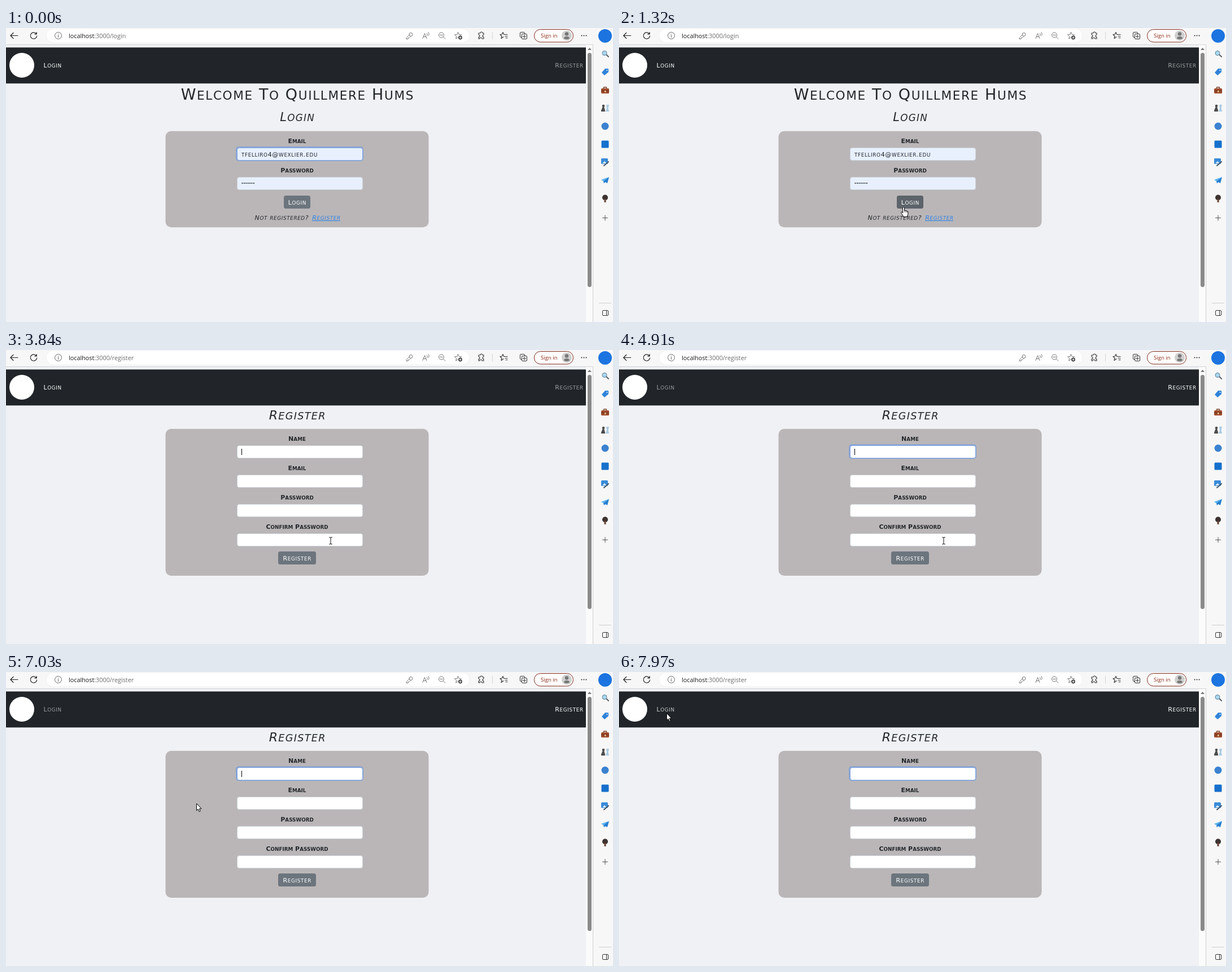
An HTML page with a canvas for the animation above (8 s loop, 1075 px wide and 521 px high).

```html
<!DOCTYPE html>
<html lang="en">
<head>
<meta charset="utf-8">
<title>Login and register</title>
<style>
html, body { margin: 0; width: 100%; height: 100%; overflow: hidden; background: #f0f1f4; }
canvas { display: block; }
</style>
</head>
<body>
<canvas id="stage" width="1075" height="521"></canvas>
<script>
const ctx = document.getElementById('stage').getContext('2d');
const LOOP = 8000;
const INK = '#212529', LINE = '#333333', MID = 515.5;

// time, x, y, pointer kind
const moves = [
  [0, 0, 0, 'none'],
  [510, 714, 422, 'arrow'], [640, 628, 396, 'arrow'],
  [930, 603, 384, 'arrow'], [1060, 566, 362, 'arrow'], [1190, 530, 337, 'arrow'],
  [1320, 504, 317, 'hand'], [1450, 503, 314, 'hand'], [1580, 504, 311, 'hand'],
  [1710, 506, 307, 'hand'], [1840, 527, 324, 'arrow'], [1970, 560, 334, 'hand'],
  [2100, 573, 338, 'hand'], [3840, 575, 338, 'beam'],
  [6510, 480, 284, 'arrow'], [6640, 376, 242, 'arrow'], [6760, 304, 218, 'arrow'],
  [7030, 337, 233, 'arrow'], [7170, 232, 138, 'arrow'], [7300, 141, 66, 'arrow'],
  [7440, 112, 67, 'arrow'], [7570, 92, 70, 'arrow'], [7700, 80, 75, 'arrow'],
  [7970, 84, 73, 'arrow']
];
const caretFlips = [3840, 4370, 4910, 5180, 5320, 5580, 5970, 6510, 7030, 7570];

function box(x, y, w, h, r, fill, stroke) {
  ctx.beginPath();
  ctx.roundRect(x, y, w, h, r);
  paint(fill, stroke);
}

function disc(x, y, r, fill, stroke) {
  ctx.beginPath();
  ctx.arc(x, y, r, 0, Math.PI * 2);
  paint(fill, stroke);
}

function paint(fill, stroke, width = 1) {
  if (fill) { ctx.fillStyle = fill; ctx.fill(); }
  if (stroke) { ctx.strokeStyle = stroke; ctx.lineWidth = width; ctx.stroke(); }
}

function shape(d, x, y, fill, stroke, width) {
  const p = new Path2D(d);
  ctx.save();
  ctx.translate(x, y);
  ctx.lineJoin = ctx.lineCap = 'round';
  if (fill) { ctx.fillStyle = fill; ctx.fill(p); }
  if (stroke) { ctx.strokeStyle = stroke; ctx.lineWidth = width || 1; ctx.stroke(p); }
  ctx.restore();
}

function text(s, x, y, size, color) {
  ctx.font = `${size}px "Open Sans", "Noto Sans", sans-serif`;
  ctx.letterSpacing = '0px';
  ctx.fillStyle = color;
  ctx.fillText(s, x, y);
  return x + ctx.measureText(s).width;
}

// Wide small caps; y is the middle of the capitals.
function caps(s, x, y, size, color, { align = 0, style = '', track = 0.06 } = {}) {
  const gap = track * size;
  const runs = s.match(/[a-z]+|[^a-z]+/g).map(run => {
    const px = /[a-z]/.test(run) ? size * 0.8 : size;
    const font = `${style} ${px}px "DejaVu Sans", sans-serif`;
    const label = run.toUpperCase();
    ctx.font = font;
    ctx.letterSpacing = gap + 'px';
    return { font, label, width: ctx.measureText(label).width };
  });
  const total = runs.reduce((sum, r) => sum + r.width, 0) - gap;
  let left = x - total * align;
  const start = left;
  ctx.fillStyle = color;
  for (const r of runs) {
    ctx.font = r.font;
    ctx.letterSpacing = gap + 'px';
    ctx.fillText(r.label, left, y + size * 0.365);
    left += r.width;
  }
  return { start, end: start + total };
}

const centered = (s, y, size, style, track) => caps(s, MID, y, size, INK, { align: 0.5, style, track });
const label = (s, y) => centered(s, y, 11, 'bold', 0);
const card = (y, h) => box(282.5, y, 466, h, 10, '#bab6b8');

function field(y, fill, focus) {
  if (focus) box(407, y - 2, 226, 26, 5, '#88a3d0');
  box(409.5, y + 0.5, 222, 22, 3.5, fill, focus ? '#86abe6' : '#ced4da');
}

function button(s, x, y, w, fill) {
  box(x, y, w, 23, 3.5, fill);
  caps(s, x + w / 2, y + 11.5, 11, '#ffffff', { align: 0.5 });
}

const STAR = 'M0-6L1.7-2 6-1.6 2.8 1.2 3.8 5.5 0 3.2-3.8 5.5-2.8 1.2-6-1.6-1.7-2Z';

function toolbar(path) {
  ctx.fillStyle = '#f7f7f7';
  ctx.fillRect(0, 0, 1075, 30);
  box(71, 1, 750, 25, 12.5, '#ffffff', '#f1f1f1');
  shape('M7 0H-6M-1-5L-6 0-1 5', 14, 13.5, null, '#222222', 1.2);
  shape('M4.6-3.4A5.7 5.7 0 1 0 5.7.5M5.2-6V-2.7H1.8', 49, 13.5, null, '#222222', 1.2);
  disc(92.5, 13.5, 6, null, '#666666');
  shape('M0-1V3M0-3.2V-3', 92.5, 13.5, null, '#666666');
  const end = text('localhost', 111, 17.5, 10.8, '#1b1b1b');
  text(':3000/' + path, end, 17.5, 10.8, '#6b6b6b');

  const grey = '#777777';
  disc(717, 11.5, 3, null, grey);
  shape('M0 0L-6 6V8H-3V6H-1L2 3', 715, 11.5, null, grey);
  shape('M-5 5L-1.5-4 2 5M-3.7 2H.7M2.5-4Q4-2.5 3 0M5-6Q7.5-3 5.5 0', 743, 13.5, null, grey);
  disc(771, 12.5, 4.5, null, grey);
  shape('M-2.5 0H2.5M3.3 3.3L7 7', 771, 12.5, null, grey);
  shape(STAR, 800.5, 13.5, null, grey);
  disc(804.5, 17, 3.4, '#444444');
  shape('M-1.7 0H1.7M0-1.7V1.7', 804.5, 17, null, '#ffffff', 0.9);
  shape('M-5-4H-2A2 2 0 1 1 2-4H4V-1A2 2 0 1 0 4 3V6H1A2 2 0 0 0-3 6H-5V3A2 2 0 0 0-5-1Z', 842, 13, null, LINE, 1.1);
  shape('M0 0V13', 861.5, 7, null, '#d5d5d5');
  shape('M1-2H7M3 1H7M4 4H7M0 2.2L-4 5-3 1-6-2-2.4-2.5-1-6 .5-2.5', 881, 13.5, null, LINE, 1.1);
  box(910.5, 7.5, 8, 9, 1.5, null, LINE);
  box(913.5, 10.5, 9, 9, 1.5, '#f7f7f7', LINE);
  shape('M-2.5 0H2.5M0-2.5V2.5', 918, 15, null, LINE);

  box(935.5, 2.5, 69, 22.5, 11, '#fffdfc', '#7d2a1c');
  text('Sign in', 947, 17, 9.6, '#8a2a18');
  disc(993, 13.5, 9, '#cfcfcf');
  disc(993, 10.5, 3.2, '#777777');
  shape('M-5 5Q-5 1.5 0 1.5T5 5Q0 8-5 5Z', 993, 13.5, '#777777');
  for (let i = -1; i < 2; i++) disc(1023.5 + i * 4, 13.5, 1, '#222222');
  ctx.fillStyle = '#d2d3d5';
  ctx.fillRect(0, 29, 1040, 1);
}

function sidebar() {
  ctx.fillStyle = '#fbfbfb';
  ctx.fillRect(1027, 30, 13, 491);
  shape('M0-2L3.5 2H-3.5Z', 1033.5, 37, '#777777');
  box(1030, 44, 7, 415, 3.5, '#8a8a8a');
  ctx.fillStyle = '#f7f7f7';
  ctx.fillRect(1040, 27, 35, 494);
  ctx.fillStyle = '#cfcfcf';
  ctx.fillRect(1039, 30, 1, 491);
  ctx.fillRect(1050, 487, 22, 1);
  disc(1061, 14, 12, '#1c74e0');

  const x = 1061;
  shape('M2 2L6 6', x, 45, null, '#555d66', 2);
  disc(x - 1, 44.5, 4, '#a8d8f2', '#5e7c90');
  shape('M0-6H5Q6-6 6-5V0L-1 6-6 1Z', x, 78, '#2f83d8');
  disc(x + 3.5, 75, 1, '#ffffff');
  shape('M-2.5-3V-5H2.5V-3', x, 110, null, '#733b24', 1.3);
  box(x - 7, 107, 14, 9, 1.5, '#9c4a2b');
  ctx.fillStyle = '#5f2b19';
  ctx.fillRect(x - 7, 111, 14, 1);
  box(x - 1, 111, 2.5, 3, 0.5, '#e9c48a');
  disc(x - 3, 138, 2.3, '#4d4d4d');
  shape('M-4-3H-2L0 4V6H-7V4Z', x, 142, '#4d4d4d');
  shape('M2-6H7L5.5 0 7 6H1L3 0Z', x, 142, '#a9cbe3');
  disc(x, 174, 6.5, '#3b82d0');
  box(x - 6.5, 199.5, 13, 13, 1.5, '#1670cc');
  box(x - 7, 231, 12, 10, 1.5, '#3a8bd8');
  shape('M-5 3L-1-1 3 3Z', x, 237, '#d5ebfa');
  shape('M-2 6L6-1', x, 238, null, '#41576b', 2);
  shape('M7-6L-7-1-3 1.5Z', x, 270, '#59b2ef');
  shape('M7-6L-3 1.5-2 5.5 0 3 4 5Z', x, 270, '#237ed0');
  disc(x, 300.5, 5, '#3d3331');
  shape('M-1.5 0H1.5V6H-1.5Z', x, 303, '#6a4636');
  shape('M-4.5 0H4.5M0-4.5V4.5', x, 336.5, null, '#555555');
  box(1056.5, 500.5, 10, 9, 1.5, null, LINE);
  shape('M0 0V9', 1063.5, 500.5, null, LINE);
}

function navbar(login, register) {
  ctx.fillStyle = '#f0f1f4';
  ctx.fillRect(0, 30, 1027, 491);
  ctx.fillStyle = INK;
  ctx.fillRect(0, 34.5, 1027, 63.8);
  disc(28, 66, 22, '#ffffff');
  caps('Login', 66.5, 66, 11, login);
  caps('Register', 1022, 66, 11, register, { align: 1 });
}

function loginPage(t) {
  centered('Welcome To Quillmere Hums', 117, 27);
  centered('Login', 157.5, 21, 'italic');
  card(182.7, 170.6);
  label('Email', 199.5);
  field(212, '#e8f0fe', t < 110);
  caps('tfelliro4@wexlier.edu', 417, 223.5, 11, INK);
  label('Password', 251.5);
  field(264, '#e8f0fe');
  for (let i = 0; i < 7; i++) disc(418.5 + i * 3.4, 275, 1.1, INK);
  button('Login', 492, 297, 47, t >= 1320 && t < 1840 ? '#5c636a' : '#6c757d');
  caps('Not registered?', 440.5, 336, 11, INK, { style: 'italic' });
  const color = t >= 1970 ? '#1a5dc2' : '#2a82e6';
  const link = caps('Register', 592, 336, 11, color, { align: 1, style: 'italic' });
  ctx.fillStyle = color;
  ctx.fillRect(link.start, 341, link.end - link.start, 1);
}

function registerPage(t) {
  centered('Register', 114.5, 22, 'italic');
  card(139.7, 260.2);
  ['Name', 'Email', 'Password', 'Confirm Password'].forEach((name, i) => {
    label(name, 156.5 + i * 52);
    field(169 + i * 52, '#ffffff', i === 0 && t >= 3970);
  });
  if (caretFlips.filter(f => f <= t).length % 2) {
    ctx.fillStyle = '#000000';
    ctx.fillRect(417, 175, 1, 11);
  }
  button('Register', 482, 357, 67, '#6c757d');
}

const pointers = {
  none() {},
  arrow(x, y) {
    shape('M.5.5V12.5L3.2 10 5.2 14.4 7.2 13.5 5.3 9.2H8.8Z', x, y, '#ffffff', '#000000', 1);
  },
  hand(x, y) {
    shape('M-1.5 1.5Q0-.8 1.5 1.5V6.5Q3 5.5 4 7 5.5 6.3 6.3 7.8 8 7.5 8 9.5V12Q8 14 6.5 15.5V17.5H-1V15.5L-4.5 10.5Q-4.5 8.5-2.8 9.2L-1.5 10.5Z', x, y, '#ffffff', '#000000', 1);
    shape('M1.5 6.5V9M4 7V9.5M6.3 7.8V10', x, y, null, '#000000', 0.7);
  },
  beam(x, y) {
    shape('M-2.5-6H-1L0-5.5 1-6H2.5M0-5.5V5.5M-2.5 6H-1L0 5.5 1 6H2.5', x, y, null, '#111111', 1);
  }
};

function draw(t) {
  const registering = t >= 3840, settled = t >= 3970;
  const dim = '#9b9d9f', bright = '#ffffff';
  const login = !settled ? bright : t >= 7570 ? '#c8c9ca' : dim;
  navbar(login, settled ? bright : dim);
  toolbar(registering ? 'register' : 'login');
  sidebar();
  (registering ? registerPage : loginPage)(t);
  const [, x, y, kind] = moves.filter(m => m[0] <= t).pop();
  pointers[kind](x, y);
}

const began = performance.now();
function tick() {
  draw((performance.now() - began) % LOOP);
  requestAnimationFrame(tick);
}
tick();
</script>
</body>
</html>
```
